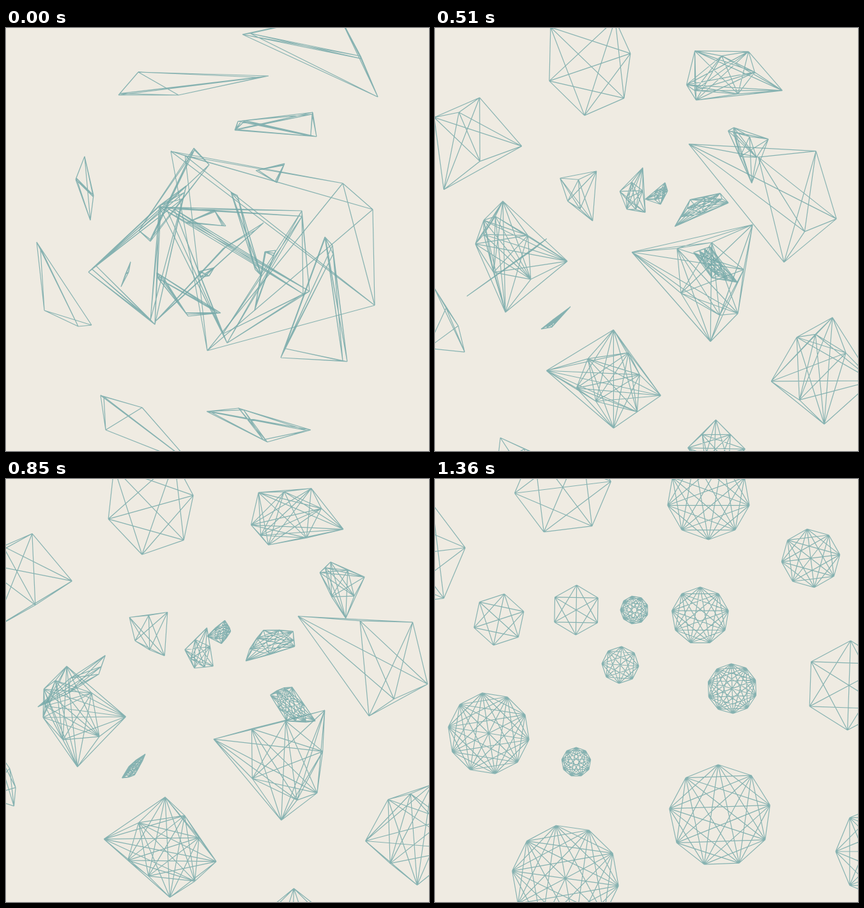
Animation, 662 px wide and 662 px high, one loop 1530 ms. Source, as an HTML page with a canvas:

```html
<!DOCTYPE html>
<html>
<head>
<meta charset="utf-8">
<style>
html, body { margin: 0; width: 100%; height: 100%; overflow: hidden; background: #efebe2; }
canvas { display: block; }
</style>
</head>
<body>
<canvas id="stage" width="662" height="662"></canvas>
<script>
const ctx = document.getElementById('stage').getContext('2d');
const STEP = 170, STEPS = 9;
const EARLY = 2, MID = 4, LAST = 8; // steps at which the poses are reached
const BACK = 0.35;                  // how far the early pose trails the middle one
const webs = [];

let seed = 7;
function random() {
  seed = (seed * 16807) % 2147483647;
  return seed / 2147483647;
}

const mix = (a, b, p) => a + (b - a) * p;
const morph = (from, to, p) =>
  from.map(([x, y], i) => [mix(x, to[i][0], p), mix(y, to[i][1], p)]);

function center(points) {
  const sum = points.reduce(([a, b], [x, y]) => [a + x, b + y], [0, 0]);
  return sum.map(v => v / points.length);
}

// Share n points among the corners; each group runs along its edge and sags inward.
function outline(flat, n, spread, sag) {
  const corners = [];
  for (let i = 0; i < flat.length; i += 2) corners.push([flat[i], flat[i + 1]]);
  const c = corners.length, mid = center(corners), points = [];
  corners.forEach((corner, k) => {
    const next = corners[(k + 1) % c];
    const first = Math.ceil(k * n / c), end = Math.ceil((k + 1) * n / c);
    for (let i = first; i < end; i++) {
      const along = (i - first) / (end - first) * spread;
      const pull = i > first ? random() * sag : 0;
      points.push([0, 1].map(d => mix(mix(corner[d], next[d], along), mid[d], pull)));
    }
  });
  return points;
}

function regular(n, x, y, r, turn) {
  return Array.from({ length: n }, (_, i) => {
    const a = (turn + 360 * i / n) * Math.PI / 180;
    return [x + r * Math.cos(a), y + r * Math.sin(a)];
  });
}

// A folded sheet opens into a crumpled outline, then into a regular polygon.
function web(n, [x, y, r, turn], crumpled, folded) {
  const start = outline(folded, n, 0.13, 0.03);
  const mid = outline(crumpled, n, 1, 0.3);
  const end = regular(n, x, y, r, turn);
  const [cx, cy] = center(mid);
  const early = mid.map(([px, py]) => [px - (x - cx) * BACK, py - (y - cy) * BACK]);
  webs.push({ start, early, mid, end });
}

web(6, [200, 13, 76, 173], [172,76, 174,-8, 275,-20, 299,33, 289,103, 227,130], [176,105, 207,69, 411,75, 270,105]);
web(6, [-38, 118, 86, -7], [122,177, 0,245, -15,132, 56,101], [137,262, 132,301, 109,237, 123,201]);
web(9, [428, 30, 65, 210], [403,29, 487,30, 540,91, 405,106, 390,82], [363,146, 480,132, 486,170, 358,160]);
web(8, [588, 124, 46, -97], [483,147, 537,165, 511,234, 474,152], [436,212, 424,242, 391,223]);
web(6, [648, 323, 70, 212], [413,191, 612,202, 644,308, 562,376], [258,193, 527,243, 574,284, 577,434, 315,505]);
web(6, [221, 205, 39, 211], [195,227, 252,216, 246,294, 207,263], [294,188, 318,214, 226,334, 208,317]);
web(8, [290, 291, 29, -86], [322,223, 326,293, 297,288, 286,260], [326,285, 344,310, 282,305]);
web(9, [312, 205, 22, -100], [354,234, 358,247, 347,268, 323,260], [326,375, 318,388, 304,390, 302,381]);
web(9, [415, 214, 45, 150], [375,301, 399,259, 446,249, 459,264], [390,378, 352,257, 362,262, 400,388]);
web(10, [84, 398, 64, -99], [102,279, 203,373, 106,453, 59,346, 72,309], [282,247, 233,464, 129,382, 240,278]);
web(6, [100, 220, 41, -78], [171,308, 150,325, 46,398], [403,305, 235,458, 340,345]);
web(9, [221, 443, 23, -90], [217,434, 188,466, 171,469, 190,454], [195,366, 192,382, 180,405, 187,385]);
web(9, [446, 527, 80, 188], [311,371, 500,328, 477,467, 434,511], [240,280, 463,286, 475,412, 346,493]);
web(10, [465, 328, 39, 196], [409,345, 435,336, 478,392, 438,385], [405,350, 422,348, 389,442]);
web(10, [204, 625, 84, -100], [269,483, 343,586, 269,637, 164,547], [236,383, 336,446, 285,451, 238,392]);
web(8, [702, 583, 75, 225], [581,492, 637,461, 700,560, 624,628, 541,561], [499,327, 511,340, 534,522, 430,516]);

// webs that drift off the stage
web(5, [-39, 490, 35, -80], [-10,410, 28,470, 38,511, -20,505], [48,335, 134,465, 113,467, 60,442]);
web(5, [86, 776, 55, -90], [95,656, 170,690, 150,740, 90,700], [148,575, 213,594, 290,682, 156,629]);
web(8, [470, 745, 60, -90], [444,626, 490,672, 440,720, 400,670], [364,595, 477,629, 409,648, 314,600]);
web(6, [549, -290, 50, 180], [480,-85, 560,-130, 575,-90, 582,-50], [370,10, 520,-22, 555,44, 582,108]);

function poseAt({ start, early, mid, end }, step) {
  if (step < EARLY) return morph(start, early, step / EARLY);
  if (step < MID) return morph(early, mid, (step - EARLY) / (MID - EARLY));
  return morph(mid, end, (step - MID) / (LAST - MID));
}

// Join every corner with every other one.
function drawWeb(points) {
  ctx.beginPath();
  points.forEach(([x, y], i) => {
    for (const [u, v] of points.slice(i + 1)) {
      ctx.moveTo(x, y);
      ctx.lineTo(u, v);
    }
  });
  ctx.stroke();
}

function draw(now) {
  const step = Math.floor(now / STEP) % STEPS;
  ctx.fillStyle = '#efebe2';
  ctx.fillRect(0, 0, 662, 662);
  ctx.strokeStyle = 'rgba(117,168,168,0.85)';
  ctx.lineWidth = 1.2;
  for (const w of webs) drawWeb(poseAt(w, step));
}

const origin = performance.now();
function tick() {
  draw(performance.now() - origin);
  requestAnimationFrame(tick);
}
tick();
</script>
</body>
</html>
```
